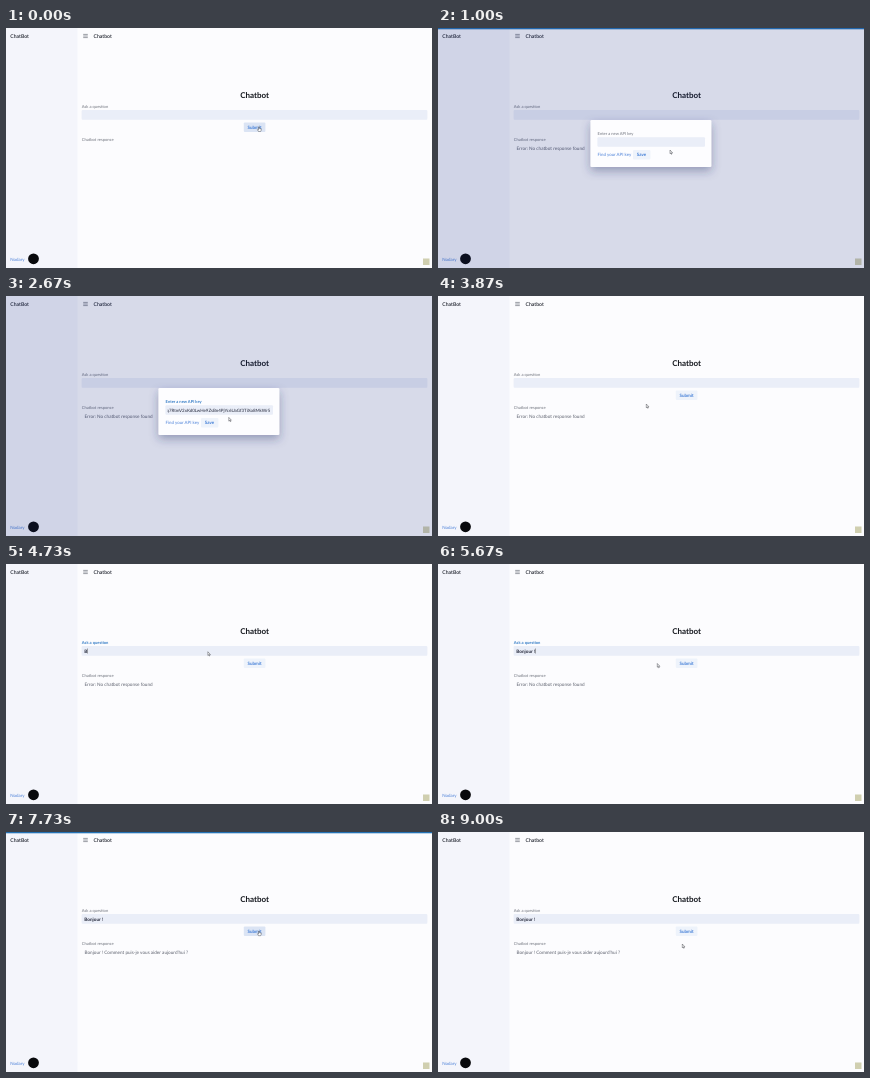
An HTML page that plays this animation: 426 by 240 pixels, repeating every 9.07 s.

```html
<!DOCTYPE html>
<html lang="en">
<head>
<meta charset="utf-8">
<title>Chatbot</title>
<style>
  html, body { margin: 0; width: 100%; height: 100%; overflow: hidden; background: #fcfcfe; }
  svg { display: block; width: 100vw; height: 100vh; }
  text { font-family: Lato, "Open Sans", sans-serif; font-size: 4.65px; fill: #5d616e; text-rendering: geometricPrecision; white-space: pre; }
  .head { font-size: 5.1px; font-weight: 600; fill: #20242e; }
  .title { font-size: 8px; font-weight: 700; fill: #14171d; text-anchor: middle; }
  .label { font-size: 4.1px; fill: #70747e; }
  .label.focus { fill: #1f6fc0; font-weight: 600; }
  .link { font-size: 4.4px; fill: #4b80d8; }
  .action { font-size: 4.5px; fill: #2c6fd2; font-weight: 600; text-anchor: middle; }
  .value { fill: #23273a; font-weight: 700; }
  #key { font-size: 4.45px; font-weight: 400; }
  .field { fill: #eaeef8; }
  .button { fill: #eef3fb; }
  .button.hover { fill: #dbe4f4; }
</style>
</head>
<body>
<svg viewBox="0 0 426 240" preserveAspectRatio="none">
  <defs>
    <filter id="shadow" x="-20%" y="-40%" width="140%" height="190%">
      <feDropShadow dx="0" dy="4" stdDeviation="5" flood-color="#2c3566" flood-opacity=".38"/>
    </filter>
    <clipPath id="keyClip"><rect x="161.5" y="109" width="103.5" height="10"/></clipPath>
  </defs>

  <rect width="426" height="240" fill="#fcfcfe"/>
  <rect width="71.5" height="240" fill="#f4f5fb"/>
  <text class="head" x="4.3" y="9.9">ChatBot</text>
  <path d="M77.2 6.4h4.6M77.2 8h4.6M77.2 9.6h4.6" stroke="#5a5e68" stroke-width=".6"/>
  <text class="head" x="87.6" y="9.9">Chatbot</text>
  <text class="link" x="4.3" y="232.6">Nodary</text>
  <circle cx="27.5" cy="230.8" r="5.4" fill="#08090c"/>
  <rect x="417" y="230.5" width="6.5" height="6.5" fill="#d0cfb0"/>

  <text class="title" x="248.6" y="69.9">Chatbot</text>
  <text class="label" id="askLabel" x="75.8" y="79.6">Ask a question</text>
  <rect class="field" x="75.6" y="82" width="345.8" height="9.8" rx="1"/>
  <text class="value" id="question" x="78.3" y="88.6"></text>
  <rect id="questionCaret" y="84.5" width=".4" height="5" fill="#222"/>
  <rect class="button" id="submit" x="237.8" y="94.4" width="21.6" height="9.6" rx="1"/>
  <text class="action" x="248.6" y="100.9">Submit</text>
  <text class="label" x="75.8" y="113">Chatbot response</text>
  <text id="response" x="78.5" y="122.4"></text>
  <rect id="progress" width="426" height="1.3" fill="#2472b4"/>

  <g id="modal">
    <rect width="426" height="240" fill="#1c2a82" fill-opacity=".165"/>
    <rect x="152.5" y="92" width="120.8" height="47" rx="1.2" fill="#fdfdff" filter="url(#shadow)"/>
    <text class="label" id="keyLabel" x="159.6" y="106.8">Enter a new API key</text>
    <rect class="field" x="159.4" y="109.2" width="107.6" height="9.6" rx="1"/>
    <text class="value" id="key" x="264.4" y="115.7" text-anchor="end" clip-path="url(#keyClip)">q7RtmV2xKd0LwHe9ZsBn4PjYc6UaGf3TiXo8MkWr5</text>
    <rect id="keyCaret" x="162.6" y="111.5" width=".4" height="5" fill="#222"/>
    <text class="link" x="159.5" y="128.2">Find your API key</text>
    <rect class="button" id="save" x="195" y="122" width="17.4" height="9.4" rx="1"/>
    <text class="action" x="203.5" y="128.2">Save</text>
  </g>

  <g id="cursor" stroke="#22252c" stroke-width=".4" stroke-linejoin="round">
    <path id="arrow" d="M0 0V3.7L.85 3L1.4 4.3L2 4L1.4 2.8H2.6Z" fill="#fff"/>
    <path id="hand" d="M-.4 0Q0-.5.4 0V1.6L2.2 2V3.4L1.6 4.7H-.5L-1.6 2.9L-1.2 2.4L-.4 3Z" fill="#fff"/>
  </g>
</svg>
<script>
const LOOP = 9070, STEP = 1000 / 15;
const $ = id => document.getElementById(id);
const during = (t, from, to) => t >= from && t < to;
const show = (id, on) => $(id).setAttribute('visibility', on ? 'inherit' : 'hidden');
const clamp = v => Math.min(1, Math.max(0, v));
const ease = v => v * v * (3 - 2 * v);

// time, x, y of the pointer tip
const path = [
  [0, 253, 98.8], [600, 253, 98.8], [1000, 232, 122], [1250, 222, 116],
  [1500, 214, 113], [2200, 214, 113], [2670, 222.8, 121.4], [2930, 204, 125.5],
  [3270, 204, 125.5], [3800, 208.3, 108], [3930, 208.3, 108], [4270, 200, 86.5],
  [4670, 200, 86.5], [5000, 219.3, 99.5], [5800, 219.3, 99.5], [6270, 253, 99],
  [8270, 253, 99], [8670, 244.3, 112], [LOOP, 244.3, 112]
];

function pointerAt(t) {
  const i = path.findIndex(p => p[0] > t);
  const [a, b] = [path[i - 1], path[i]];
  const k = ease((t - a[0]) / (b[0] - a[0]));
  return [a[1] + (b[1] - a[1]) * k, a[2] + (b[2] - a[2]) * k];
}

function responseAt(t) {
  if (t < 730) return '';
  return t < 7400 ? 'Error: No chatbot response found'
                  : 'Bonjour ! Comment puis-je vous aider aujourd\u2019hui ?';
}

function render(t) {
  const [x, y] = pointerAt(t);
  const open = clamp((t - 730) / 220) * (1 - clamp((t - 3270) / 200));
  const overSubmit = open === 0 && x > 238 && x < 259 && y > 94 && y < 104;
  const overSave = open > 0 && x > 195 && x < 212.4 && y > 122 && y < 131;
  const overButton = overSubmit || overSave;

  $('cursor').setAttribute('transform', `translate(${x} ${y})`);
  show('hand', overButton);
  show('arrow', !overButton);
  $('submit').classList.toggle('hover', overSubmit);
  $('save').classList.toggle('hover', overSave);

  $('modal').setAttribute('opacity', open);
  show('modal', open > 0);
  show('key', t >= 2130);
  show('keyCaret', during(t, 1530, 2130) && (t - 1530) % 1000 < 500);
  $('keyLabel').classList.toggle('focus', during(t, 1530, 3070));

  const typed = clamp((t - 4600) / 900);
  const asking = during(t, 4270, 6530);
  $('question').textContent = 'Bonjour !'.slice(0, Math.floor(typed * 9));
  $('askLabel').classList.toggle('focus', asking);
  $('questionCaret').setAttribute('x', 78.5 + $('question').getComputedTextLength());
  show('questionCaret', asking && (typed > 0 && typed < 1 || (t - 5500) % 1000 < 500));

  $('response').textContent = responseAt(t);
  show('progress', during(t, 400, 1070) || during(t, 6600, 7930));
}

function frame(now) {
  const t = now % LOOP;
  render(Math.floor(t / STEP + 0.05) * STEP);
  requestAnimationFrame(frame);
}
render(0);
requestAnimationFrame(frame);
</script>
</body>
</html>
```
